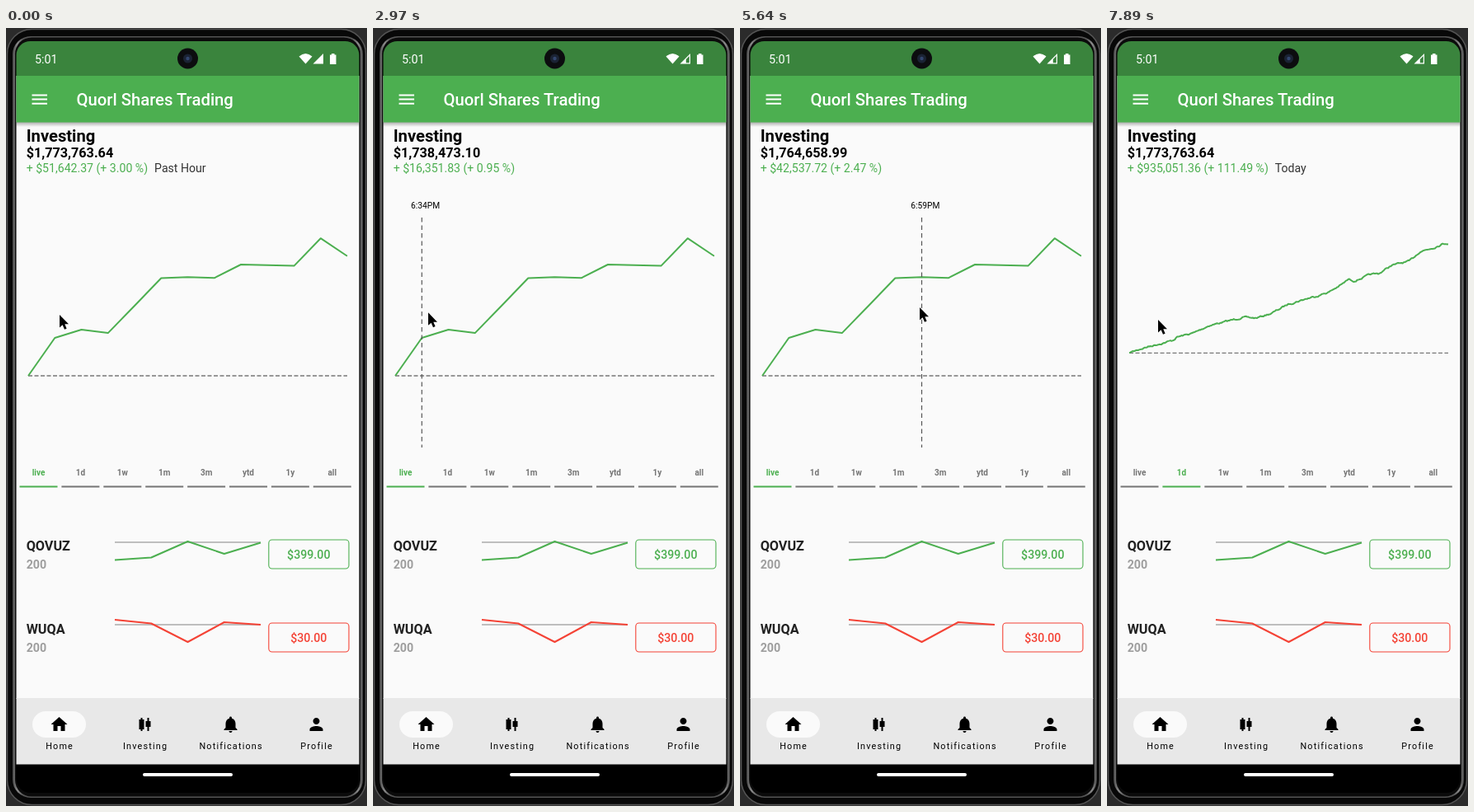
Write an HTML page that moves like this. It is 438x944 px and loops after 8000 ms.

```html
<!DOCTYPE html>
<html lang="en">
<head>
<title>Portfolio chart</title>
<style>
html, body { margin: 0; width: 100%; height: 100%; overflow: hidden; background: #2b2b2b; }
svg { display: block; width: 438px; height: 944px; font-family: Roboto, "Open Sans", sans-serif; }
.bold { font-weight: 700; }
.mid { text-anchor: middle; }
.line { fill: none; stroke-width: 2; stroke-linejoin: round; }
.nav { font-size: 10.8px; letter-spacing: 1.2px; text-anchor: middle; }
.tab { font-size: 10px; font-weight: 700; text-anchor: middle; }
</style>
</head>
<body>
<svg id="stage" viewBox="0 0 438 944">
  <defs>
    <linearGradient id="shade" x2="0" y2="1">
      <stop stop-color="#000" stop-opacity=".32"/>
      <stop offset="1" stop-color="#000" stop-opacity="0"/>
    </linearGradient>
    <linearGradient id="rim" x2="1" y2="0">
      <stop stop-color="#4a4a4a"/><stop offset=".014" stop-color="#8c8c8c"/>
      <stop offset=".03" stop-color="#555"/><stop offset=".97" stop-color="#555"/>
      <stop offset=".986" stop-color="#8c8c8c"/><stop offset="1" stop-color="#4a4a4a"/>
    </linearGradient>
    <clipPath id="screen"><rect x="12.5" y="16" width="416" height="912" rx="17"/></clipPath>
  </defs>

  <rect width="438" height="944" fill="#2b2b2b"/>
  <rect x="1.5" y="1.5" width="435" height="941" rx="30" fill="#080808" stroke="#555" stroke-width="1.5"/>
  <rect x="8" y="10" width="425" height="924" rx="22" fill="url(#rim)"/>
  <rect x="11" y="11.5" width="419" height="921" rx="20" fill="#0b0b0b"/>
  <g clip-path="url(#screen)">
    <rect x="12" y="16" width="417" height="912"/>
    <rect x="12" y="58" width="417" height="756" fill="#fafafa"/>
    <rect x="12" y="114" width="417" height="6" fill="url(#shade)"/>
    <rect x="12" y="16" width="417" height="42" fill="#3a843d"/>
    <rect x="12" y="58" width="417" height="56.5" fill="#4caf50"/>
    <rect x="12" y="813" width="417" height="80.5" fill="#e8e8e8"/>
  </g>
  <rect x="166" y="904" width="109" height="4" rx="2" fill="#fff"/>

  <circle cx="220.5" cy="37" r="12.5" fill="#0c0d0f"/>
  <circle cx="220.5" cy="37" r="5.5" fill="#1b2334"/>
  <circle cx="220.5" cy="37" r="2.2" fill="#33466e"/>
  <g fill="#fff">
    <text x="35" y="43" font-size="14.3">5:01</text>
    <path d="M355.5 34.5Q363.5 27.5 371.5 34.5L363.5 43.5Z"/>
    <path d="M372.5 43.5H385V31Z"/>
    <path d="M393 32.5H395V31H398.5V32.5H400.5V44H393Z"/>
    <path d="M31.5 80.5h18.5v2h-18.5zM31.5 85.6h18.5v2h-18.5zM31.5 90.7h18.5v2h-18.5z"/>
    <text x="85.5" y="94" font-size="20.3" font-weight="500">Quorl Shares Trading</text>
  </g>
  <path id="weakSignal" d="M379.8 42.3V38L383.8 34V42.3Z" fill="#3a843d"/>

  <text class="bold" x="24.7" y="138" font-size="20.2">Investing</text>
  <text class="bold" id="total" x="24.7" y="157" font-size="16.2"></text>
  <text y="174.5" x="24.7" font-size="14.1" fill="#4caf50"><tspan id="gain"></tspan><tspan id="period" dx="8" fill="#333"></tspan></text>

  <path id="baseline" fill="none" stroke="#777" stroke-width="1.3" stroke-dasharray="5 2.5"/>
  <path id="chart" class="line" stroke="#4caf50"/>
  <g id="crosshair">
    <path d="M0 230V509" stroke="#555" stroke-width="1.2" stroke-dasharray="5.5 4"/>
    <text id="clock" class="mid" x="4.3" y="219" font-size="10.2"></text>
  </g>

  <g id="tabs"></g>
  <g id="holdings"></g>
  <rect x="32" y="829" width="65" height="32" rx="16" fill="#fafafa"/>
  <g id="nav"></g>
  <path id="cursor" d="M0 0V15.5L3.6 12.3L6 17.8L8.6 16.7L6.3 11.3H11Z" stroke="#fff" stroke-width="1.1" stroke-linejoin="round" paint-order="stroke"/>
</svg>
<script>
const $ = id => document.getElementById(id);
const GREEN = '#4caf50', RED = '#f44336', GRAY = '#757575';
const LEFT = 27, WIDTH = 387, LOOP = 8000, STEP = 148.9;
const lerp = (a, b, k) => a + (b - a) * k;
const toPath = points => 'M' + points.map(p => p[0].toFixed(2) + ' ' + p[1].toFixed(2)).join('L');

// Piecewise linear lookup in rows of [position, ...values].
function sample(rows, at) {
  if (at <= rows[0][0]) return rows[0].slice(1);
  const i = rows.findIndex(row => row[0] >= at);
  if (i < 0) return rows[rows.length - 1].slice(1);
  const a = rows[i - 1], b = rows[i], k = (at - a[0]) / (b[0] - a[0]);
  return a.slice(1).map((v, j) => lerp(v, b[j + 1], k));
}

// Static parts
const tabNames = ['live', '1d', '1w', '1m', '3m', 'ytd', '1y', 'all'];
$('tabs').innerHTML = tabNames.map((name, i) => {
  const x = 16.5 + i * 50.9;
  return `<g><text class="tab" x="${x + 23}" y="543">${name}</text><rect x="${x}" y="555.5" width="46" height="2"/></g>`;
}).join('');

function holding(name, price, color, y, refY, trend) {
  const points = trend.map((v, i) => [132 + i * 44.25, v]);
  return `<text class="bold" x="24.7" y="${y + 12.5}" font-size="16.2" fill="#212121">${name}</text>
    <text class="bold" x="24.7" y="${y + 34.7}" font-size="14.2" fill="#9e9e9e">200</text>
    <path d="M132 ${refY}H309" stroke="#aaa" stroke-width="1.6"/>
    <path class="line" d="${toPath(points)}" stroke="${color}"/>
    <rect x="318.8" y="${y}" width="97.2" height="35" rx="4" fill="none" stroke="${color}" stroke-width="1.1"/>
    <text class="mid" x="367.3" y="${y + 22.6}" font-size="14.2" font-weight="500" fill="${color}">${price}</text>`;
}
$('holdings').innerHTML =
  holding('QOVUZ', '$399.00', GREEN, 621, 624, [645.5, 642.5, 623, 638, 624.5]) +
  holding('WUQA', '$30.00', RED, 722, 724, [718, 722.5, 745, 721, 724]);

const navItems = [
  ['Home', 'M10 20v-6h4v6h5v-8h3L12 3 2 12h3v8z'],
  ['Investing', 'M9 4H7v2H5v12h2v2h2v-2h2V6H9zM19 8h-2V4h-2v4h-2v7h2v5h2v-5h2z'],
  ['Notifications', 'M12 22c1.1 0 2-.9 2-2h-4c0 1.1.89 2 2 2zm6-6v-5c0-3.07-1.64-5.64-4.5-6.32V4c0-.83-.67-1.5-1.5-1.5s-1.5.67-1.5 1.5v.68C7.63 5.36 6 7.92 6 11v5l-2 2v1h16v-1l-2-2z'],
  ['Profile', 'M12 12c2.21 0 4-1.79 4-4s-1.79-4-4-4-4 1.79-4 4 1.79 4 4 4zm0 2c-2.67 0-8 1.34-8 4v2h16v-2c0-2.66-5.33-4-8-4z']
];
$('nav').innerHTML = navItems.map(([name, icon], i) => {
  const x = 64.5 + i * 104;
  return `<path transform="translate(${x - 12} 833)" d="${icon}"/><text class="nav" x="${x + 0.6}" y="875">${name}</text>`;
}).join('');

// Chart data: gains over the past hour, and the day's trend with a small wobble
const START = 1722121.27;
const gains = [0, 16351.83, 19908.14, 18457.57, 30215.68, 42127.25, 42537.72,
  42198.36, 47990.41, 47706.12, 47422.85, 59300.54, 51642.37];
const hour = gains.map((g, i) => [LEFT + i * WIDTH / 12, 422 - g / 355.5]);
const trend = [[27, 394], [45, 388], [80, 379], [85, 375], [105, 370], [124, 361], [145, 356],
  [165, 351], [181, 352], [200, 346], [220, 335], [240, 329], [255, 325], [270, 320], [285, 311],
  [293, 305], [300, 307], [320, 299], [330, 298], [345, 288], [367, 283], [380, 271], [395, 267],
  [407, 262], [414, 261]];
let seed = 7, wobble = 0;
const random = () => (seed = seed * 16807 % 2147483647) / 2147483647;
const day = Array.from({ length: 288 }, (_, i) => {
  const x = LEFT + i * WIDTH / 287;
  wobble = wobble * 0.65 + (random() - 0.5) * 1.6;
  return [x, sample(trend, x)[0] + (i ? wobble : 0)];
});

// Pointer tip at given steps
const pointer = [[0, 65, 348], [2, 57, 351], [6, 57, 351], [11, 112, 348], [13, 112, 348],
  [15, 80, 347], [16, 62, 347], [18, 57, 346], [21, 72, 345], [26, 127, 342], [29, 160, 341],
  [37, 217, 339], [38, 218, 339], [41, 118, 490], [42, 74, 538], [43, 91, 546], [47, 91, 546],
  [51, 62, 354]];

const money = v => '$' + v.toLocaleString('en-US', { minimumFractionDigits: 2, maximumFractionDigits: 2 });

function render(t) {
  const step = Math.floor((t + 20) / STEP);
  const dayTab = step >= 45, dayData = step >= 46;
  const touching = step >= 5 && !dayData;

  const [x, y] = sample(pointer, step);
  $('cursor').setAttribute('transform', `translate(${x} ${y})`);

  // The crosshair snaps to the nearest point, one step behind the pointer.
  const lagged = sample(pointer, Math.min(step - 1, 37))[0];
  const index = touching ? Math.round((lagged - LEFT) / (WIDTH / 12)) : 12;
  $('crosshair').style.display = touching ? '' : 'none';
  $('crosshair').setAttribute('transform', `translate(${hour[index][0]} 0)`);
  $('clock').textContent = `6:${29 + index * 5}PM`;

  const gain = dayData ? 935051.36 : gains[index];
  const percent = dayData ? 111.49 : gain / START * 100;
  $('total').textContent = money(START + gains[index]);
  $('gain').textContent = `+ ${money(gain)} (+ ${percent.toFixed(2)} %)`;
  $('period').textContent = touching ? '' : dayData ? 'Today' : 'Past Hour';

  // The first points glide from the hour's places to the day's.
  const glide = step >= 53 ? 1 : Math.max(0, 1 - Math.exp(-(step * STEP - 20 - 6852) / 236));
  const points = dayData
    ? day.map((p, i) => hour[i] ? p.map((v, j) => lerp(hour[i][j], v, glide)) : p)
    : hour;
  $('chart').setAttribute('d', toPath(points));
  $('baseline').setAttribute('d', `M${LEFT} ${dayData ? 394.3 : 422}H414`);

  [...$('tabs').children].forEach((tab, i) => tab.setAttribute('fill', i === +dayTab ? GREEN : GRAY));
  $('weakSignal').style.display = step >= 20 ? '' : 'none';
}

const began = performance.now();
function tick() {
  render((performance.now() - began) % LOOP);
  requestAnimationFrame(tick);
}
tick();
</script>
</body>
</html>
```
